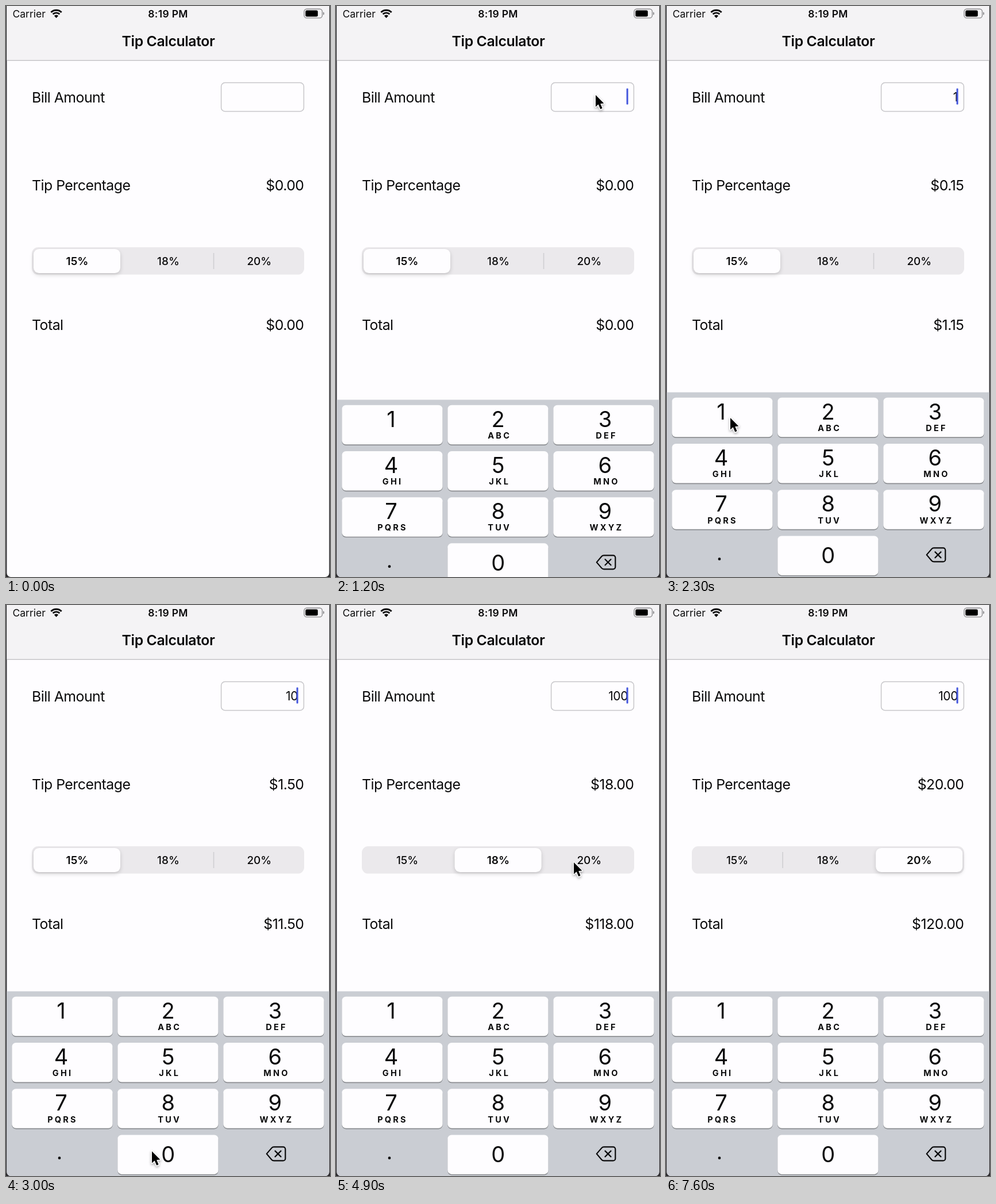
Recreate the animation shown at these times as an HTML page with a canvas. Size 564 by 994 pixels, loop 8000 ms.

```html
<!DOCTYPE html>
<html lang="en">
<head>
<meta charset="utf-8">
<title>Tip Calculator</title>
<style>
  html, body { margin: 0; height: 100%; overflow: hidden; background: #fefdff; }
  canvas { display: block; }
</style>
</head>
<body>
<canvas id="stage" width="564" height="994"></canvas>
<script>
const ctx = document.getElementById('stage').getContext('2d');
const LOOP = 8000, STEP = 100;
const WHITE = '#fefdff', INK = '#0a0a0b';
const KEYBOARD_TOP = 672.5, KEYBOARD_HEIGHT = 321.5;
const RATES = [15, 18, 20];
const KEYS = ['1', '2 ABC', '3 DEF', '4 GHI', '5 JKL', '6 MNO', '7 PQRS', '8 TUV', '9 WXYZ', '.', '0', '<'];

// Pointer stops: time, x, y
const POINTER = [
  [100, 140, 528], [400, 420, 96], [600, 452, 155], [1400, 452, 155],
  [1800, 195, 915], [2100, 112, 717], [2500, 112, 717], [2700, 254, 951],
  [3600, 254, 951], [4300, 268, 450], [4600, 268, 450], [4900, 414, 448], [5300, 425, 449], [6500, 425, 449]
];
const PRESSES = [[2200, '1'], [2900, '0'], [3300, '0']];

const clamp = v => Math.min(1, Math.max(0, v));
const smooth = v => v * v * (3 - 2 * v);
const easeOut = v => 1 - (1 - v) ** 3;
const mix = (a, b, v) => a + (b - a) * v;

function box(x, y, w, h, r, fill) {
  ctx.beginPath();
  ctx.roundRect(x, y, w, h, r);
  if (fill) {
    ctx.fillStyle = fill;
    ctx.fill();
  }
}

function text(str, x, y, size, { align = 'left', weight = 400, spacing = 0, color = INK } = {}) {
  ctx.font = `${weight} ${size}px Inter, sans-serif`;
  ctx.textAlign = align;
  ctx.letterSpacing = spacing + 'px';
  ctx.fillStyle = color;
  ctx.fillText(str, x, y);
}

function line(points, width, color, close) {
  ctx.beginPath();
  points.forEach(([x, y]) => ctx.lineTo(x, y));
  if (close) ctx.closePath();
  ctx.lineWidth = width;
  ctx.strokeStyle = color;
  ctx.stroke();
}

function shadow(color = 'transparent', blur = 0, dy = 0) {
  ctx.shadowColor = color;
  ctx.shadowBlur = blur;
  ctx.shadowOffsetY = dy;
}

function drawHeader() {
  ctx.fillStyle = '#f4f3f5';
  ctx.fillRect(0, 0, 564, 94);
  ctx.fillStyle = '#c1c0c3';
  ctx.fillRect(0, 94, 564, 1.4);
  text('Carrier', 11.5, 20, 17.5);
  text('8:19 PM', 282, 20, 17.5, { align: 'center', weight: 600, spacing: 0.3 });
  text('Tip Calculator', 282.5, 70, 24.8, { align: 'center', weight: 600, spacing: -0.4 });

  // Wi-Fi
  ctx.strokeStyle = INK;
  ctx.lineWidth = 2.9;
  for (const r of [8.3, 13]) {
    ctx.beginPath();
    ctx.arc(87.5, 20.2, r, -Math.PI * 0.75, -Math.PI * 0.25);
    ctx.stroke();
  }
  ctx.fillStyle = INK;
  ctx.beginPath();
  ctx.moveTo(87.5, 21);
  ctx.arc(87.5, 20.8, 5.2, -Math.PI * 0.75, -Math.PI * 0.25);
  ctx.fill();

  // Battery
  box(519, 5.3, 31.5, 15.6, 4.5);
  ctx.lineWidth = 1.4;
  ctx.strokeStyle = '#8d8c8f';
  ctx.stroke();
  box(521.3, 7.6, 21.5, 11, 2.4, '#000');
  box(552, 10.6, 1.9, 5, [0, 2, 2, 0], '#8d8c8f');
}

function caretAlpha(t) {
  const reset = [3400, 3000, 2300, 900].find(start => t >= start);
  if (reset === undefined) return t >= 600 ? 1 : 0;
  const age = t - reset;
  if (age < 600) return 1;
  const phase = (age - 600) % 1000;
  if (phase < 500) return Math.max(0, 0.7 - phase / 250);
  return phase < 600 ? 0.5 : 1;
}

function drawForm(t) {
  const bill = t >= 3400 ? 100 : t >= 3000 ? 10 : t >= 2300 ? 1 : 0;
  const selected = t >= 5600 ? 2 : t >= 4500 ? 1 : 0;
  const tip = bill * RATES[selected] / 100;
  const label = { spacing: -0.5 }, amount = { spacing: -0.5, align: 'right' };

  text('Bill Amount', 45, 168, 24.8, label);
  text('Tip Percentage', 45, 320.8, 24.8, label);
  text('Total', 45, 564.3, 24.8, label);
  text('$' + tip.toFixed(2), 518.5, 320.8, 24.8, amount);
  text('$' + (bill + tip).toFixed(2), 518.5, 564.3, 24.8, amount);

  box(374.6, 133.6, 143.8, 49.8, 6.5);
  ctx.lineWidth = 1.5;
  ctx.strokeStyle = '#c6c5c9';
  ctx.stroke();
  if (bill) text(bill, 508, 165.8, 21, { align: 'right', spacing: -0.4 });
  ctx.globalAlpha = caretAlpha(t);
  box(505.6, 143.5, 3, 28, 1, '#4456dc');
  ctx.globalAlpha = 1;

  drawSegments(t, selected);
}

function drawSegments(t, selected) {
  const slide = easeOut(clamp((t - 4400) / 400)) + easeOut(clamp((t - 5500) / 400));
  box(45, 420, 474, 47.6, 11, '#ebe9ec');
  [1, 2].forEach(i => {
    ctx.globalAlpha = clamp(Math.abs(slide - i + 0.5) * 2 - 1);
    ctx.fillStyle = '#cecdd0';
    ctx.fillRect(44 + i * 158.4, 430, 1.5, 28);
  });
  ctx.globalAlpha = 1;
  shadow('rgba(0,0,0,.17)', 7, 3);
  box(48 + slide * 158.6, 423, 151, 42, 9.5, WHITE);
  shadow();
  RATES.forEach((rate, i) => text(rate + '%', 124 + i * 158.4, 450.8, 19,
    { align: 'center', weight: i === selected ? 600 : 500 }));
}

function drawBackspace(x, y) {
  ctx.lineJoin = ctx.lineCap = 'round';
  ctx.beginPath();
  ctx.moveTo(x - 16.3, y);
  ctx.lineTo(x - 7.5, y - 10.3);
  ctx.quadraticCurveTo(x - 6, y - 12, x - 3.5, y - 12);
  ctx.arcTo(x + 16.3, y - 12, x + 16.3, y, 4);
  ctx.arcTo(x + 16.3, y + 12, x, y + 12, 4);
  ctx.lineTo(x - 3.5, y + 12);
  ctx.quadraticCurveTo(x - 6, y + 12, x - 7.5, y + 10.3);
  ctx.closePath();
  ctx.lineWidth = 2.2;
  ctx.strokeStyle = INK;
  ctx.stroke();
  line([[x - 1.5, y - 5], [x + 8.5, y + 5]], 2.2, INK);
  line([[x + 8.5, y - 5], [x - 1.5, y + 5]], 2.2, INK);
}

function drawKeyboard(t) {
  if (t < 1000) return;
  const top = KEYBOARD_TOP + KEYBOARD_HEIGHT * Math.exp((943 - t) / 80);
  ctx.fillStyle = '#cacdd3';
  ctx.fillRect(0, top, 564, 994);

  KEYS.forEach((key, i) => {
    const col = i % 3, row = Math.floor(i / 3);
    const x = 10.3 + col * 184, y = top + 9.3 + row * 80.2;
    const middle = 96 + col * 186.2;
    const [digit, letters] = key.split(' ');
    if (digit === '.') {
      ctx.fillStyle = INK;
      ctx.beginPath();
      ctx.arc(93, y + 40.3, 2.4, 0, Math.PI * 2);
      ctx.fill();
    } else if (digit === '<') {
      drawBackspace(470, y + 33);
    } else {
      const pressed = PRESSES.some(([start, k]) => k === digit && t >= start && t < start + STEP);
      box(x, y + 1.7, 175.2, 68.5, 7, '#8b8d91');
      box(x, y, 175.2, 68.5, 7, pressed ? '#b3b8c1' : WHITE);
      text(digit, middle, y + (row === 3 ? 47.5 : 37.8), 38, { align: 'center' });
      if (letters) text(letters, middle + 2.5, y + 58.3, 14.5, { align: 'center', weight: 700, spacing: 3.2 });
    }
  });
}

function drawPointer(t) {
  const next = POINTER.findIndex(stop => stop[0] > t);
  if (next < 1) return;
  const [t0, x0, y0] = POINTER[next - 1], [t1, x1, y1] = POINTER[next];
  const v = smooth((t - t0) / (t1 - t0));
  ctx.save();
  ctx.translate(mix(x0, x1, v), mix(y0, y1, v));
  ctx.lineJoin = 'round';
  shadow('rgba(0,0,0,.35)', 4, 2);
  line([[0, 0], [0, 20.5], [4.7, 16.3], [8.2, 24.6], [11.6, 23.1], [8.2, 15.1], [14.4, 14.6]], 3, '#fff', true);
  shadow();
  ctx.fillStyle = '#000';
  ctx.fill();
  ctx.restore();
}

function draw(t) {
  ctx.fillStyle = '#2b2a2d';
  ctx.fillRect(0, 0, 564, 994);
  ctx.save();
  box(1.4, -10, 561.2, 1004, [0, 0, 7, 7], WHITE);
  ctx.clip();
  drawHeader();
  drawForm(t);
  drawKeyboard(t);
  drawPointer(t);
  ctx.restore();
}

const begin = performance.now();
function tick() {
  const elapsed = Math.max(0, performance.now() - begin) % LOOP;
  draw(Math.floor(elapsed / STEP) * STEP);
  requestAnimationFrame(tick);
}
tick();
</script>
</body>
</html>
```
